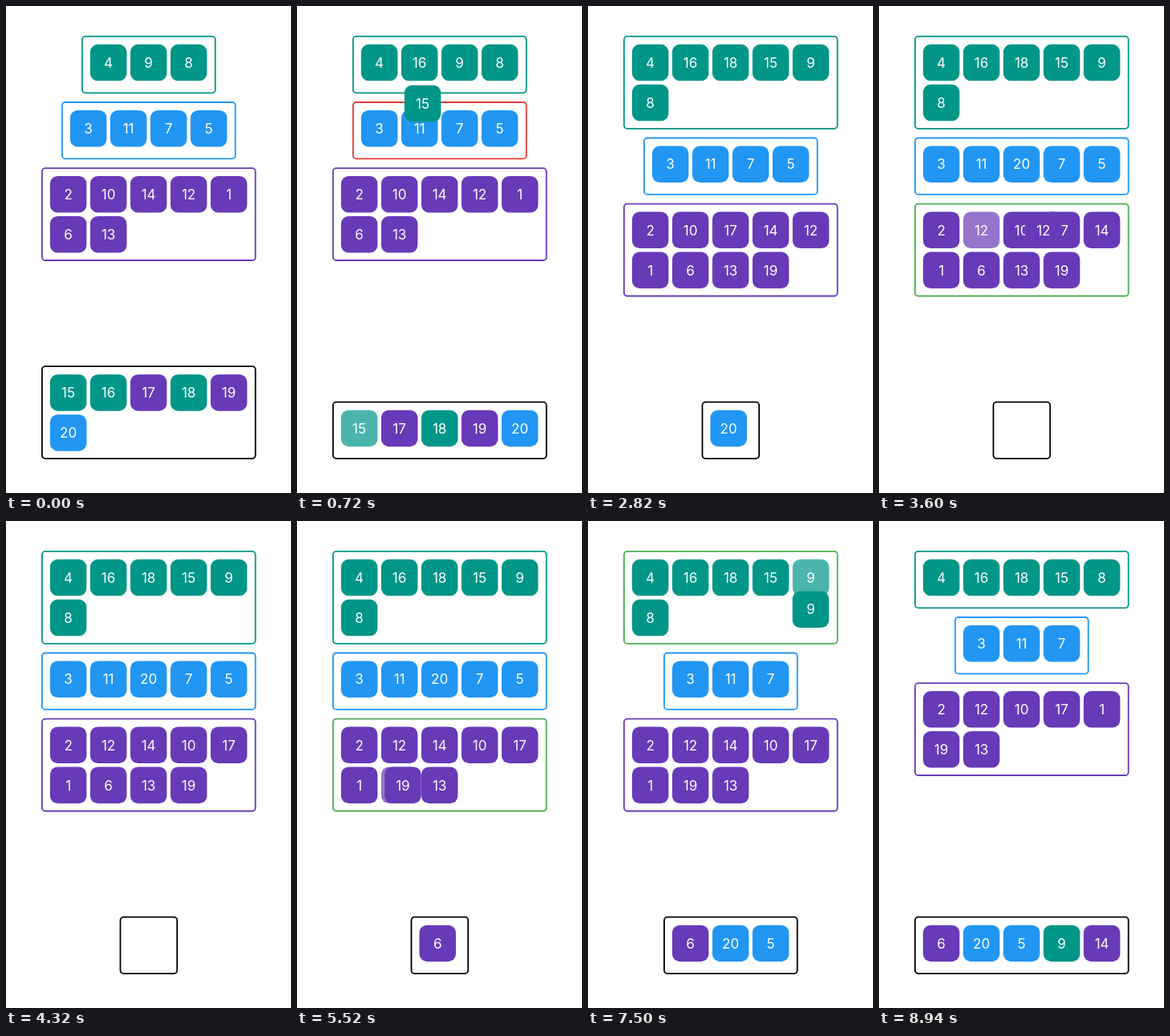
An HTML page for the animation above (9000 ms loop, 355x607 px).

```html
<!DOCTYPE html>
<html lang="en">
<head>
<meta charset="utf-8">
<title>Sorting tiles</title>
<style>
  html, body { margin: 0; width: 100%; height: 100%; overflow: hidden; background: #fff; }
  svg { display: block; width: 100%; height: 100%; }
  text { font: 400 17px Inter, Roboto, sans-serif; fill: #fff; text-anchor: middle; }
</style>
</head>
<body>
<svg id="stage" viewBox="0 0 355 607"></svg>
<script>
const LOOP = 9000, TRAVEL = 0.78, FADED = 0.7;
const CENTER = 177.8, PITCH = 50, SIZE = 45.5, INSET = 33.6;
const TOP = 37, BOTTOM = 565, GAP = 9.9, LOW = 72.2, HIGH = 116.7;
const TEAL = '#009688', BLUE = '#2196f3', PURPLE = '#673ab7';
const BORDERS = [TEAL, BLUE, PURPLE, '#000'];
const YES = '#4caf50', NO = '#e53935', POOL = 3;

const START = [
  [4, 9, 8],
  [3, 11, 7, 5],
  [2, 10, 14, 12, 1, 6, 13],
  [15, 16, 17, 18, 19, 20]
];
const KIND = {};
START.slice(0, 3).forEach((list, kind) => list.forEach(id => KIND[id] = kind));
Object.assign(KIND, { 15: 0, 16: 0, 18: 0, 17: 2, 19: 2, 20: 1 });

// start, end, tile, box, index, optional dip below the slot
const DRAGS = [
  [40, 420, 16, 0, 1],
  [440, 900, 15, 0, 2],
  [970, 1820, 18, 0, 2],
  [1912, 2330, 17, 2, 2],
  [2370, 2800, 19, 2, 8],
  [2860, 3340, 20, 1, 2],
  [3400, 3810, 12, 2, 1],
  [3880, 4290, 14, 2, 2],
  [4400, 5060, 6, POOL, 0],
  [5150, 5700, 19, 2, 6],
  [5820, 6540, 20, POOL, 1, 44],
  [6660, 7300, 5, POOL, 2],
  [7400, 8080, 9, POOL, 3],
  [8180, 8860, 14, POOL, 4]
];

function move(lists, id, box, index) {
  const next = lists.map(list => list.filter(n => n !== id));
  next[box].splice(index, 0, id);
  return next;
}

function layout(lists) {
  const slots = {};
  let top = TOP;
  const boxes = lists.map((list, i) => {
    const w = Math.max(72.5, 17.6 + PITCH * Math.min(list.length, 5));
    const h = list.length > 5 ? HIGH : LOW;
    const x = CENTER - w / 2;
    const y = i === POOL ? BOTTOM - h : top;
    top += h + GAP;
    list.forEach((id, n) => slots[id] = {
      x: x + INSET + PITCH * (n % 5),
      y: y + INSET + PITCH * Math.floor(n / 5)
    });
    return { x, y, w, h };
  });
  return { boxes, slots };
}

let current = START;
const steps = DRAGS.map(([start, end, id, box, index, dip = 0]) => {
  const before = current;
  current = move(before, id, box, index);
  return {
    start, end, id, box, dip, before, after: current,
    source: before.findIndex(list => list.includes(id)),
    rest: layout(before),
    from: layout(before).slots[id],
    to: layout(current).slots[id]
  };
});

function dragPose(step, t) {
  const u = (t - step.start) / (step.end - step.start);
  const k = Math.min(1, u / TRAVEL);
  const p = (1 - Math.cos(Math.PI * k)) / 2;
  const late = Math.max(0, (u - TRAVEL) / (1 - TRAVEL));
  const x = step.from.x + (step.to.x - step.from.x) * p * p;
  const y = step.from.y + (step.to.y - step.from.y) * p + step.dip * Math.sin(Math.PI * late);
  const over = k === 1 ? step.box : step.rest.boxes.findIndex(b =>
    x >= b.x && x <= b.x + b.w && y >= b.y && y <= b.y + b.h);
  const placed = over === step.box && (step.source !== step.box || p > 0.5);
  return { x, y, over, placed };
}

const svg = document.getElementById('stage');
function add(parent, tag, attrs) {
  const el = document.createElementNS('http://www.w3.org/2000/svg', tag);
  for (const key in attrs) el.setAttribute(key, attrs[key]);
  return parent.appendChild(el);
}
function makeTile() {
  const g = add(svg, 'g', {});
  const rect = add(g, 'rect', { x: -SIZE / 2, y: -SIZE / 2, width: SIZE, height: SIZE, rx: 9.5 });
  const text = add(g, 'text', { y: 6.2 });
  return { g, rect, text };
}
function paint(tile, id) {
  tile.rect.setAttribute('fill', BORDERS[KIND[id]]);
  tile.text.textContent = id;
}
function place(tile, pos, opacity) {
  tile.g.setAttribute('transform', `translate(${pos.x} ${pos.y})`);
  tile.g.setAttribute('opacity', opacity);
}

const frames = BORDERS.map(() => add(svg, 'rect', { fill: '#fff', rx: 4, 'stroke-width': 1.8 }));
const tiles = {};
for (const id in KIND) paint(tiles[id] = makeTile(), id);
const held = makeTile();

function draw(t) {
  const step = steps.find(s => t >= s.start && t < s.end);
  const pose = step && dragPose(step, t);
  const done = steps.filter(s => t >= s.end).pop();
  const lists = step ? (pose.placed ? step.after : step.before) : done ? done.after : START;
  const { boxes, slots } = layout(lists);

  boxes.forEach((b, i) => {
    let color = BORDERS[i];
    if (pose && pose.over === i) color = i === POOL || KIND[step.id] === i ? YES : NO;
    const attrs = { x: b.x + 0.9, y: b.y + 0.9, width: b.w - 1.8, height: b.h - 1.8, stroke: color };
    for (const key in attrs) frames[i].setAttribute(key, attrs[key]);
  });
  for (const id in tiles) place(tiles[id], slots[id], step && step.id === +id ? FADED : 1);

  held.g.setAttribute('visibility', step ? 'visible' : 'hidden');
  if (step) {
    paint(held, step.id);
    place(held, pose, 1);
  }
}

const origin = performance.now();
function tick() {
  draw((performance.now() - origin) % LOOP);
  requestAnimationFrame(tick);
}
tick();
</script>
</body>
</html>
```
